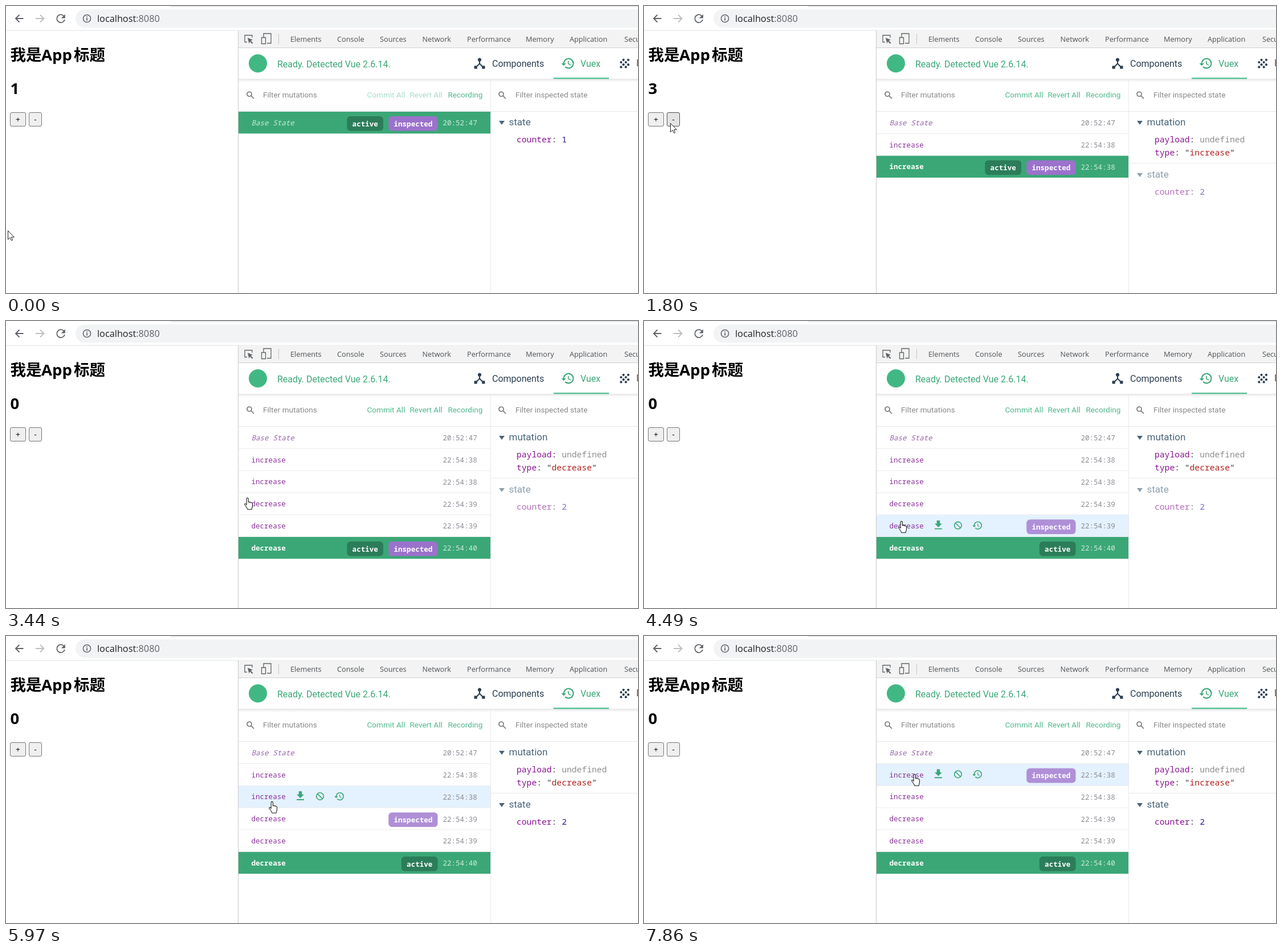
An HTML page for the animation above (8000 ms loop, 1109 px wide and 505 px high).

```html
<!DOCTYPE html>
<html lang="zh">
<head>
<meta charset="utf-8">
<title>Counter store demo</title>
<style>
html, body { margin: 0; width: 100%; height: 100%; overflow: hidden; background: #fff; }
svg { display: block; width: 100%; height: 100%; }
text { white-space: pre; }
.title { font: bold 27.5px "Open Sans", "Noto Sans CJK SC", "Noto Sans CJK", sans-serif; }
.url { font: 16.3px "Open Sans", sans-serif; fill: #5f6368; }
.tab { font: 12.7px "Open Sans", sans-serif; fill: #4d5156; }
.nav { font: 16px Roboto, sans-serif; fill: #2c3e50; }
.tool { font: 13.55px Roboto, sans-serif; fill: #888; }
.head { font: 17px Roboto, sans-serif; fill: #486579; }
.mono { font: 12.55px "Noto Sans Mono", monospace; }
.tag { font-weight: bold; fill: #fff; }
.data { font: 14.66px "Noto Sans Mono", monospace; fill: #333; }
.key { fill: #881391; }
.num { fill: #2a1a9f; }
.str { fill: #b3201c; }
.mute { fill: #8f8f8f; }
.btn { font: 13.5px "Liberation Sans", Arial, sans-serif; text-anchor: middle; }
.green { fill: #3ba776; }
.line { fill: none; stroke: #5f6368; stroke-width: 1.8; }
</style>
</head>
<body>
<svg id="stage" viewBox="0 0 1109 505" preserveAspectRatio="none">
  <defs>
    <linearGradient id="shade" x2="0" y2="1">
      <stop stop-color="#000" stop-opacity=".1"/><stop offset="1" stop-color="#000" stop-opacity="0"/>
    </linearGradient>
    <path id="history" d="M13 3a9 9 0 0 0-9 9H1l3.9 3.9.1.1L9 12H6a7 7 0 1 1 2.06 4.94l-1.42 1.42A9 9 0 1 0 13 3zm-1 5v5l4.28 2.54.72-1.21-3.5-2.08V8z"/>
    <path id="hub" d="M17 16l-4-4V8.82a3 3 0 1 0-2 0V12l-4 4H3v5h5v-3.05l4-4.2 4 4.2V21h5v-5z"/>
    <path id="download" d="M19 9h-4V3H9v6H5l7 7zM5 18v2h14v-2z"/>
    <g id="search" fill="none" stroke="#777" stroke-width="1.7"><circle cx="5" cy="5" r="4"/><path d="M8 8l5 5"/></g>
    <path id="arrow" d="M.5.5v15.3l3.6-3.3 2.4 5.2 2.3-1-2.3-5h4.9z" fill="#fff" stroke="#222" stroke-linejoin="round"/>
    <path id="hand" d="M4.2 12.5V2a1.6 1.6 0 0 1 3.2 0v6c.3-1 2.4-1 2.7.3.6-.8 2.1-.5 2.4.6.7-.5 2 0 2 1.3v4.3c0 2.5-1.4 3.5-1.4 6H5.8C5.5 17.5 3 15.5 1 12.5c-1-1.6.8-2.6 2-1.5z" fill="#fff" stroke="#222" stroke-width="1.1" stroke-linejoin="round"/>
  </defs>
  <g id="fixed"></g>
  <g id="live"></g>
  <use id="cursor" href="#arrow"/>
</svg>
<script>
const LOOP = 8000, ROW_TOP = 186, PITCH = 38.8;
const $ = id => document.getElementById(id);
const text = (x, y, cls, str, more = '') => `<text x="${x}" y="${y}" class="${cls}" ${more}>${str}</text>`;
const rect = (x, y, w, h, fill, more = '') => `<rect x="${x}" y="${y}" width="${w}" height="${h}" fill="${fill}" ${more}/>`;
const path = (d, more = '') => `<path d="${d}" ${more}/>`;
const icon = (id, cx, cy, k, fill) =>
  `<use href="#${id}" transform="translate(${cx - 12 * k} ${cy - 12 * k}) scale(${k})" fill="${fill}"/>`;

function browserBar() {
  return rect(288, 0, 821, 1.5, '#dee1e6') + rect(122, 6, 1010, 32, '#f1f3f4', 'rx="16"') +
    rect(0, 42.5, 1109, 1, '#dfe1e4') +
    path('M30.5 22H17M23.5 15.5L17 22l6.5 6.5', 'class="line"') +
    path('M52 22h14.5M60 15.5l6.5 6.5-6.5 6.5', 'class="line" style="stroke:#bbbec2"') +
    path('M101.5 17.5A7 7 0 1 0 103 24', 'class="line"') + path('M103.8 14.5v7h-7z', 'fill="#5f6368"') +
    '<circle cx="142" cy="22" r="6.6" class="line" style="stroke-width:1.5"/>' +
    rect(141.2, 21, 1.7, 4.6, '#5f6368') + rect(141.2, 18.2, 1.7, 1.7, '#5f6368') +
    text(160, 28, 'url', '<tspan fill="#202124">localhost</tspan>:8080');
}

function toolTabs() {
  const tabs = { Elements: 499, Console: 581, Sources: 656, Network: 730.5, Performance: 809, Memory: 912, Application: 989, Security: 1085 };
  return rect(408, 43, 701, 30, '#f3f3f3') + rect(408, 73, 701, 1, '#d0d0d0') + rect(407, 43, 1, 462, '#c8c8c8') +
    path('M423 63.500h-4v-12h13v4', 'class="line" style="stroke-width:1.3"') + path('M424 56l9 3.500-3.500 1.500 4 4-1.500 1.500-4-4-1.500 3.500z', 'fill="#5f6368"') +
    path('M452 55v-6.500h13v17h-7M448.500 55.500h7v11h-7z', 'class="line" style="stroke-width:1.3"') +
    rect(478, 49, 1, 18, '#c4c4c4') +
    Object.entries(tabs).map(([name, x]) => text(x, 63, 'tab', name)).join('');
}

function panelHeader() {
  const dots = [[10, 6], [18, 6], [6, 10], [14, 10], [10, 14], [18, 14], [6, 18], [14, 18]];
  return rect(408, 128, 701, 6, 'url(#shade)') +
    '<circle cx="442" cy="101" r="16" fill="#41b883"/>' +
    text(476, 108, 'nav', 'Ready. Detected Vue 2.6.14.', 'style="fill:#3ba776"') +
    icon('hub', 831, 101, 1.05, '#2c3e50') + text(853, 107, 'nav', 'Components') +
    icon('history', 986, 101, 1.05, '#3ba776') + text(1008, 107, 'nav', 'Vuex', 'style="fill:#3ba776"') +
    rect(961, 126, 97, 2.5, '#5fc39a') +
    dots.map(([x, y]) => `<circle cx="${1073 + x * 1.05}" cy="${88.5 + y * 1.05}" r="2.1" fill="#2c3e50"/>`).join('') +
    text(1106, 106, 'nav', 'Events', 'style="fill:#b5332c"') +
    '<use href="#search" x="422" y="150"/><use href="#search" x="864" y="150"/>' +
    text(451, 161, 'tool', 'Filter mutations') + text(894, 161, 'tool', 'Filter inspected state') +
    text(775.500, 161, 'tool', 'Recording', 'style="fill:#4fb88c"') +
    rect(850, 130, 1, 375, '#e8e8e8') + rect(408, 185, 701, 1, '#e6e6e6');
}

$('fixed').innerHTML = browserBar() + toolTabs() + panelHeader() +
  text(7.5, 96, 'title', '我是') + text(62, 96, 'title', 'App') + text(119, 96, 'title', '标题');

const log = [['Base State', '20:52:47'], ['increase', '22:54:38'], ['increase', '22:54:38'],
  ['decrease', '22:54:39'], ['decrease', '22:54:39'], ['decrease', '22:54:40']];

// Each step overrides part of the view from its time on.
const steps = [
  [0, { count: 1, rows: 1, inspected: null, shown: 1, stale: false, commit: .5, hover: -1, over: '' }],
  [800, { over: '+' }],
  [870, { count: 2 }],
  [940, { rows: 2, shown: 2, stale: true, commit: .65 }],
  [1200, { count: 3 }],
  [1400, { rows: 3, commit: 1, over: '' }],
  [1530, { over: '-' }],
  [1930, { count: 2 }],
  [2220, { rows: 4 }],
  [2350, { count: 1 }],
  [2680, { rows: 5 }],
  [2950, { count: 0 }],
  [3150, { rows: 6 }],
  [3210, { over: '' }],
  [3510, { hover: 4 }],
  [4420, { inspected: 4 }],
  [4550, { shown: 1, stale: false }],
  [4980, { hover: 3 }],
  [5430, { inspected: 3, stale: true }],
  [5560, { shown: 2, stale: false }],
  [5830, { hover: 2 }],
  [6230, { inspected: 2, stale: true }],
  [6360, { shown: 3, stale: false }],
  [6480, { hover: 1 }],
  [6910, { inspected: 1, stale: true }],
  [7040, { shown: 2, stale: false }]
];

const route = [[70, 3, 395], [450, 8, 290], [800, 17, 197], [1270, 17, 197], [1600, 46, 206], [3150, 46, 206],
  [3440, 418, 311], [3630, 446, 352], [4750, 446, 352], [5110, 458, 331], [5160, 458, 325], [5240, 458, 322],
  [5700, 458, 322], [6030, 462, 284], [6300, 462, 284], [6590, 469, 246], [6850, 469, 243]];

function button(x, w, label, on) {
  return rect(x + .5, 187.5, w, 24, on ? '#e3e3e3' : '#efefef', `rx="2.5" stroke="${on ? '#4f4f4f' : '#767676'}"`) +
    text(x + w / 2 + .5, 203.5, 'btn', label);
}

function tag(right, y, label, fill) {
  const w = label.length * 7.53 + 18.5;
  return rect(right - w, y + 8, w, 25.7, fill, 'rx="6"') + text(right - w + 9.3, y + 25.5, 'mono tag', label);
}

function row(i, view) {
  const [name, time] = log[i], y = ROW_TOP + PITCH * i;
  const active = i === view.rows - 1, inspected = i === (view.inspected ?? view.rows - 1);
  const hover = i === view.hover && !active;
  const style = i ? (active ? 'fill:#fff;font-weight:600' : 'fill:#8a3399')
    : 'font-style:italic;fill:' + (active ? '#c9ead9' : '#9a63ac');
  let out = active ? rect(408, y, 442, 38.4, '#3ba776')
    : (hover ? rect(408, y, 442, 38.4, '#e4f1fe') : '') + rect(408, y + 38, 442, 1, '#ececec');
  out += text(430.5, y + 23.7, 'mono', name, `style="${style}"`) +
    text(766.5, y + 24.2, 'mono', time, `fill="${active ? '#cfeadd' : '#8c8c94'}"`);
  if (inspected) out += tag(757.5, y, 'inspected', active ? '#9b72cb' : '#af90d7');
  if (active) out += tag(inspected ? 662 : 757.5, y, 'active', '#2b7d59');
  if (hover) out += icon('download', 516.5, y + 18, .92, '#3ba776') + icon('history', 585, y + 18.5, .8, '#3ba776') +
    `<g fill="none" stroke="#3ba776" stroke-width="1.6"><circle cx="551" cy="${y + 18.5}" r="6.3"/>` +
    path(`M546.5 ${y + 14}l9 9`) + '</g>';
  return out;
}

const heading = (y, label) => path(`M865 ${y - 4}h10l-5 7z`, 'fill="#486579"') + text(882.5, y + 4, 'head', label);
const field = (y, key, cls, value) =>
  text(896, y, 'data', `<tspan class="key">${key}</tspan>: <tspan class="${cls}">${value}</tspan>`);

function inspector(view) {
  const base = view.rows === 1, dy = base ? 0 : 92;
  const type = log[view.inspected ?? view.rows - 1][0];
  const mutation = base ? '' : heading(206, 'mutation') + field(240, 'payload', 'mute', 'undefined') +
    text(896, 262.500, 'data', `<tspan class="key">type</tspan>: "<tspan class="str">${type}</tspan>"`) +
    rect(851, 276, 258, 1, '#e8e8e8');
  return mutation + `<g opacity="${view.stale ? .62 : 1}">` + heading(206 + dy, 'state') +
    field(240 + dy, 'counter', 'num', view.shown) + '</g>';
}

function draw(view) {
  const fade = `style="fill:#4fb88c" opacity="${view.commit}"`;
  $('live').innerHTML = text(7.5, 155, 'title', view.count) +
    button(7, 27, '+', view.over === '+') + button(40, 22, '-', view.over === '-') +
    text(633.5, 161, 'tool', 'Commit All', fade) + text(708.5, 161, 'tool', 'Revert All', fade) +
    log.slice(0, view.rows).map((_, i) => row(i, view)).join('') + inspector(view);
}

function moveCursor(t) {
  const next = route.findIndex(p => p[0] > t);
  const b = route[next < 0 ? route.length - 1 : next], a = next > 0 ? route[next - 1] : b;
  const k = a === b ? 0 : (t - a[0]) / (b[0] - a[0]);
  const [x, y] = [1, 2].map(j => Math.round(a[j] + (b[j] - a[j]) * k));
  $('cursor').setAttribute('href', x > 404 ? '#hand' : '#arrow');
  $('cursor').setAttribute('transform', `translate(${x} ${y})`);
}

let drawn = 0;
const start = performance.now();
function tick() {
  const t = Math.max(0, performance.now() - start) % LOOP;
  const past = steps.filter(s => s[0] <= t);
  if (past.length !== drawn) {
    drawn = past.length;
    draw(Object.assign({}, ...past.map(s => s[1])));
  }
  moveCursor(t);
  requestAnimationFrame(tick);
}
tick();
</script>
</body>
</html>
```
